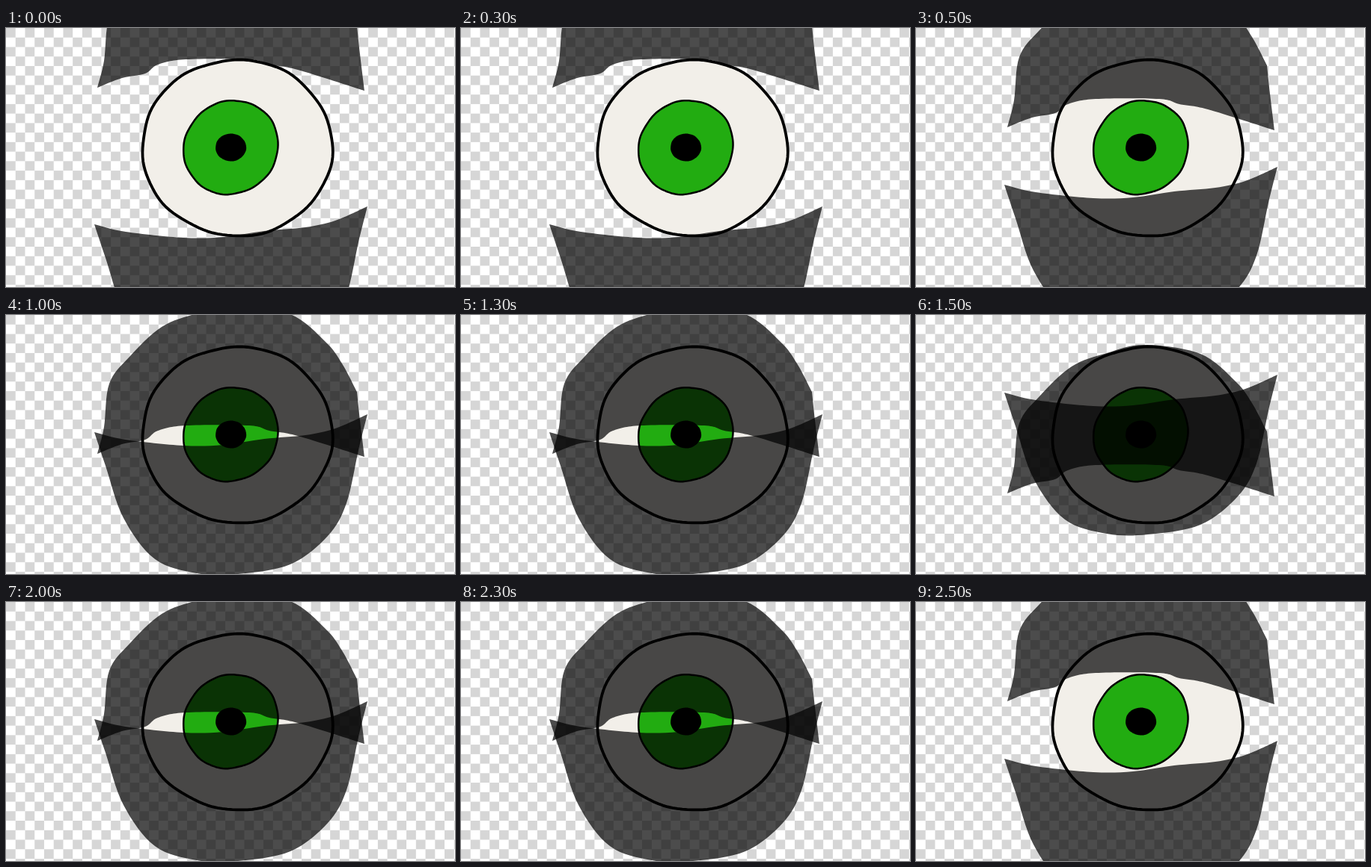
Write an HTML page that moves like this. It is 600x347 px and loops after 3000 ms.

```html
<!DOCTYPE html>
<html lang="en">
<head>
<meta charset="utf-8">
<title>Blinking eye</title>
<style>
  html, body { margin: 0; width: 100%; height: 100%; overflow: hidden; background: #fff; }
  svg { display: block; width: 600px; height: 347px; }
  .line { stroke: #000; stroke-linejoin: round; }
  .lid { fill: #000; fill-opacity: .7; }
</style>
</head>
<body>
<svg viewBox="0 0 600 347">
  <defs>
    <pattern id="checker" width="25.48" height="25.48" patternUnits="userSpaceOnUse">
      <path d="M0 0h12.74v25.48h12.74v-12.74H0z" fill="#d6d6d6"/>
    </pattern>
  </defs>
  <rect width="600" height="347" fill="url(#checker)"/>
  <path id="ball" class="line" fill="#f2efe9" stroke-width="3.8"/>
  <path id="iris" class="line" fill="#22ac11" stroke-width="2.5"/>
  <path id="pupil"/>
  <path id="upper" class="lid"/>
  <path id="lower" class="lid"/>
</svg>
<script>
const LOOP = 3000, STEP = 53, SHUT = 3;

// Slightly uneven, tilted ellipse
function blob(cx, cy, rx, ry, tilt = 0) {
  const pts = [];
  for (let i = 0; i < 120; i++) {
    const t = i / 120 * 2 * Math.PI;
    const r = 1 + .006 * Math.sin(5 * t + 1) + .004 * Math.sin(11 * t);
    const x = rx * r * Math.cos(t), y = ry * r * Math.sin(t);
    const c = Math.cos(tilt), s = Math.sin(tilt);
    pts.push(`${(cx + x * c - y * s).toFixed(2)},${(cy + x * s + y * c).toFixed(2)}`);
  }
  return `M${pts.join('L')}Z`;
}

// Catmull-Rom spline through the key points of one edge
function curve(pts) {
  const at = i => pts[Math.max(0, Math.min(pts.length - 1, i))];
  return pts.slice(1).map((c, i) => {
    const a = at(i - 1), b = at(i), e = at(i + 2);
    const p = b.map((v, k) => v + (c[k] - a[k]) / 6);
    const q = c.map((v, k) => v - (e[k] - b[k]) / 6);
    return `C${p} ${q} ${c}`;
  }).join('');
}

// Smooth edges that meet in sharp corners
function shape(...edges) {
  const parts = edges.map(e => e.split(' ').map(p => p.split(',').map(Number)));
  return `M${parts[0][0]}${parts.map(curve).join('')}Z`;
}

const paths = {
  ball: blob(309, 160.5, 127, 118),
  iris: blob(300.5, 160, 65, 61, -.75),
  pupil: blob(300.5, 160, 20.5, 18.5),
  upper: shape(
    '122,80 155,67 186,61 203,49 240,42 325,42 352,49 390,56 479,84',
    '479,84 473,35 469,-3',
    '469,-3 449,-41 427,-70 380,-107 305,-119 255,-108 208,-90 165,-50 138,-14 131,44 122,80'),
  lower: shape(
    '118,263 160,273 237,281 290,280 345,272 400,267 440,258 483,239',
    '483,239 471,287 455,358 430,402 380,440 310,453 255,452 199,433 157,378 133,308 118,263')
};

for (const id in paths) document.getElementById(id).setAttribute('d', paths[id]);

// Close in hard steps, then open the same way
function blink(id, dir) {
  const count = 2 * SHUT, frames = [];
  for (let i = 0; i <= count; i++) {
    const pose = SHUT - Math.abs(SHUT - i);
    frames.push({ transform: `translateY(${dir * pose * STEP}px)`, easing: 'step-end' });
  }
  document.getElementById(id).animate(frames, { duration: LOOP, iterations: Infinity });
}

blink('upper', 1);
blink('lower', -1);
</script>
</body>
</html>
```
